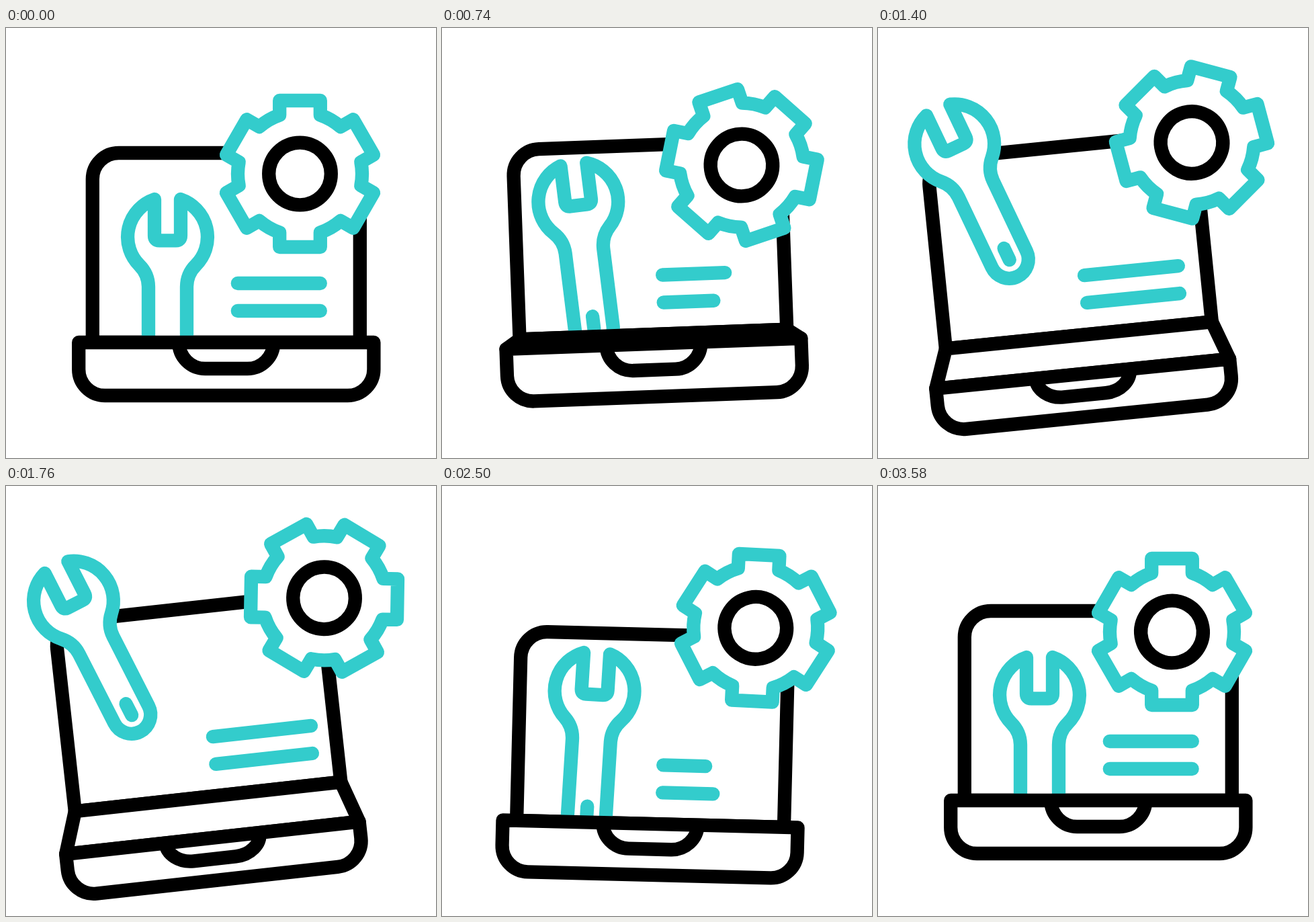
Animation, 640 px wide and 640 px high, one loop 3600 ms. Source, as an HTML page with a canvas:

```html
<!DOCTYPE html>
<html lang="en">
<head>
<meta charset="utf-8">
<title>Laptop repair icon</title>
<style>
  html, body { margin: 0; height: 100%; overflow: hidden; background: #fff; }
  canvas { display: block; width: 640px; height: 640px; }
</style>
</head>
<body>
<canvas id="stage" width="640" height="640"></canvas>
<script>
const LOOP = 3600, LAG = 120;
const TEAL = '#33cccc', BLACK = '#000';
const ctx = document.getElementById('stage').getContext('2d');

const rest = {
  gearX: 437.5, gearY: 217, gearAngle: 0,
  wrenchX: 240.5, wrenchY: 311, wrenchAngle: 0,
  laptopX: 327.8, laptopY: 468, laptopAngle: 0,
  open: 0, line: 123
};

// Poses are offsets from rest; whatever is left out stays at rest.
const windUp = {
  gearY: 8, gearAngle: 24.5, wrenchX: 13.2, wrenchY: 14.5, wrenchAngle: 5,
  laptopY: -9.5, open: -14.5, line: -58
};
const raised = {
  gearX: 22.5, gearY: -41.7, gearAngle: 59.5,
  wrenchX: -110.2, wrenchY: -136, wrenchAngle: -23.3,
  laptopX: -29.8, laptopY: -13.2, laptopAngle: -5.1, open: 52, line: 9.5
};
const drifted = {
  gearX: 36, gearY: -50.2, gearAngle: 90.9,
  wrenchX: -140, wrenchY: -140, wrenchAngle: -27,
  laptopX: -27.2, laptopY: -5.6, laptopAngle: -6.3, open: 61.7, line: 24
};
const recoil = {
  gearX: 29.3, gearY: -5.7, gearAngle: 122.8,
  wrenchX: -13.5, wrenchY: -6, wrenchAngle: 3.6,
  laptopX: -17.8, laptopY: 35, laptopAngle: 1.43, line: -60
};
const settle = {
  gearY: 7.5, gearAngle: 134.5, wrenchY: 4,
  laptopX: 4.2, laptopY: 19, laptopAngle: 2.55, open: -11, line: -5
};
// Before returning, everything leans further along its drift.
const stretched = {};
for (const name in drifted) stretched[name] = raised[name] + 1.5 * (drifted[name] - raised[name]);

const beats = [
  [60, {}], [480, windUp], [1040, raised], [1760, drifted], [1980, stretched],
  [2500, recoil], [2980, settle], [3560, { gearAngle: 120 }]
];

// Smooth curve through (time, value) points that never overshoots them.
function spline(times, values) {
  const slope = values.slice(1).map((v, i) => (v - values[i]) / (times[i + 1] - times[i]));
  const tangent = values.map((_, i) => {
    const a = slope[i - 1], b = slope[i];
    return a * b > 0 ? 2 * a * b / (a + b) : 0;
  });
  return t => {
    const last = times.length - 1;
    if (t <= times[0]) return values[0];
    if (t >= times[last]) return values[last];
    const i = times.findIndex(k => k > t) - 1;
    const h = times[i + 1] - times[i], u = (t - times[i]) / h, w = 1 - u;
    return values[i] * (1 + 2 * u) * w * w + values[i + 1] * (3 - 2 * u) * u * u
      + h * u * w * (tangent[i] * w - tangent[i + 1] * u);
  };
}

const at = {};
for (const name in rest) {
  at[name] = spline(beats.map(b => b[0]), beats.map(b => rest[name] + (b[1][name] || 0)));
}

const lidShape = 'M-199 0V-243A39 39 0 0 1-160-282H160A39 39 0 0 1 199-243V0Z';
const wrenchShape = 'M-19.5-56A59.3 59.3 0 0 0-42 42A46 46 0 0 1-28.5 74V190'
  + 'A28.5 28.5 0 0 0 28.5 190V74A46 46 0 0 1 42 42A59.3 59.3 0 0 0 19.5-56'
  + 'V-2Q19.5 5.3 12.5 5.3H-12.5Q-19.5 5.3-19.5-2Z';

function draw(shape, color, filled = true, cap = 'butt') {
  const path = new Path2D(shape);
  if (filled) ctx.fill(path);
  ctx.lineCap = cap;
  ctx.strokeStyle = color;
  ctx.stroke(path);
}

function place(part, t) {
  ctx.translate(at[part + 'X'](t), at[part + 'Y'](t));
  ctx.rotate(at[part + 'Angle'](t) * Math.PI / 180);
}

function drawScreen(t) {
  ctx.save();
  place('laptop', t);
  draw(lidShape, BLACK);
  draw(`M17-88h${at.line(t)}M17-47h${at.line(t - LAG)}`, TEAL, false, 'round');
  ctx.restore();
}

// The wrench shows only above the hinge.
function drawWrench(t) {
  ctx.save();
  ctx.save();
  place('laptop', t);
  ctx.beginPath();
  ctx.rect(-900, -1200, 1800, 1200);
  ctx.restore();
  ctx.clip();
  place('wrench', t);
  draw(wrenchShape, TEAL);
  draw('M0 172V191', TEAL, false, 'round');
  ctx.restore();
}

// The base grows shallower as the hinge opens.
function drawBase(t) {
  const open = at.open(t), squash = 1 - 0.0033 * Math.max(0, at.open(t - LAG));
  const depth = 79 * squash, notch = 39 * squash;
  ctx.save();
  place('laptop', t);
  if (open > 0) draw(`M-199 0H199L219.6 ${open}H-219.6Z`, BLACK);
  ctx.translate(0, open);
  draw(`M-219.6 0V${depth - 39}A39 39 0 0 0-180.6 ${depth}H180.6`
    + `A39 39 0 0 0 219.6 ${depth - 39}V0Z`, BLACK);
  draw(`M-70.5 0A39 ${notch} 0 0 0-31.5 ${notch}H31.5A39 ${notch} 0 0 0 70.5 0`, BLACK, false);
  ctx.restore();
}

function drawGear(t) {
  const inner = 92.5, half = 30.3, top = -109;
  const start = Math.asin(half / inner), step = Math.PI / 3;
  ctx.save();
  place('gear', t);
  ctx.beginPath();
  for (let i = 0; i < 6; i++) {
    ctx.lineTo(-half, top);
    ctx.lineTo(half, top);
    ctx.arc(0, 0, inner, start - Math.PI / 2, step - start - Math.PI / 2);
    ctx.rotate(step);
  }
  ctx.closePath();
  ctx.fill();
  ctx.strokeStyle = TEAL;
  ctx.stroke();
  draw('M-46.3 0A46.3 46.3 0 0 1 46.3 0A46.3 46.3 0 0 1-46.3 0Z', BLACK);
  ctx.restore();
}

function render(now) {
  const t = now % LOOP;
  ctx.fillStyle = '#fff';
  ctx.fillRect(0, 0, 640, 640);
  ctx.lineWidth = 20.3;
  ctx.lineJoin = 'round';
  drawScreen(t);
  drawWrench(t);
  drawBase(t);
  drawGear(t);
}

const begin = performance.now();
function tick() {
  render(performance.now() - begin);
  requestAnimationFrame(tick);
}
tick();
</script>
</body>
</html>
```
